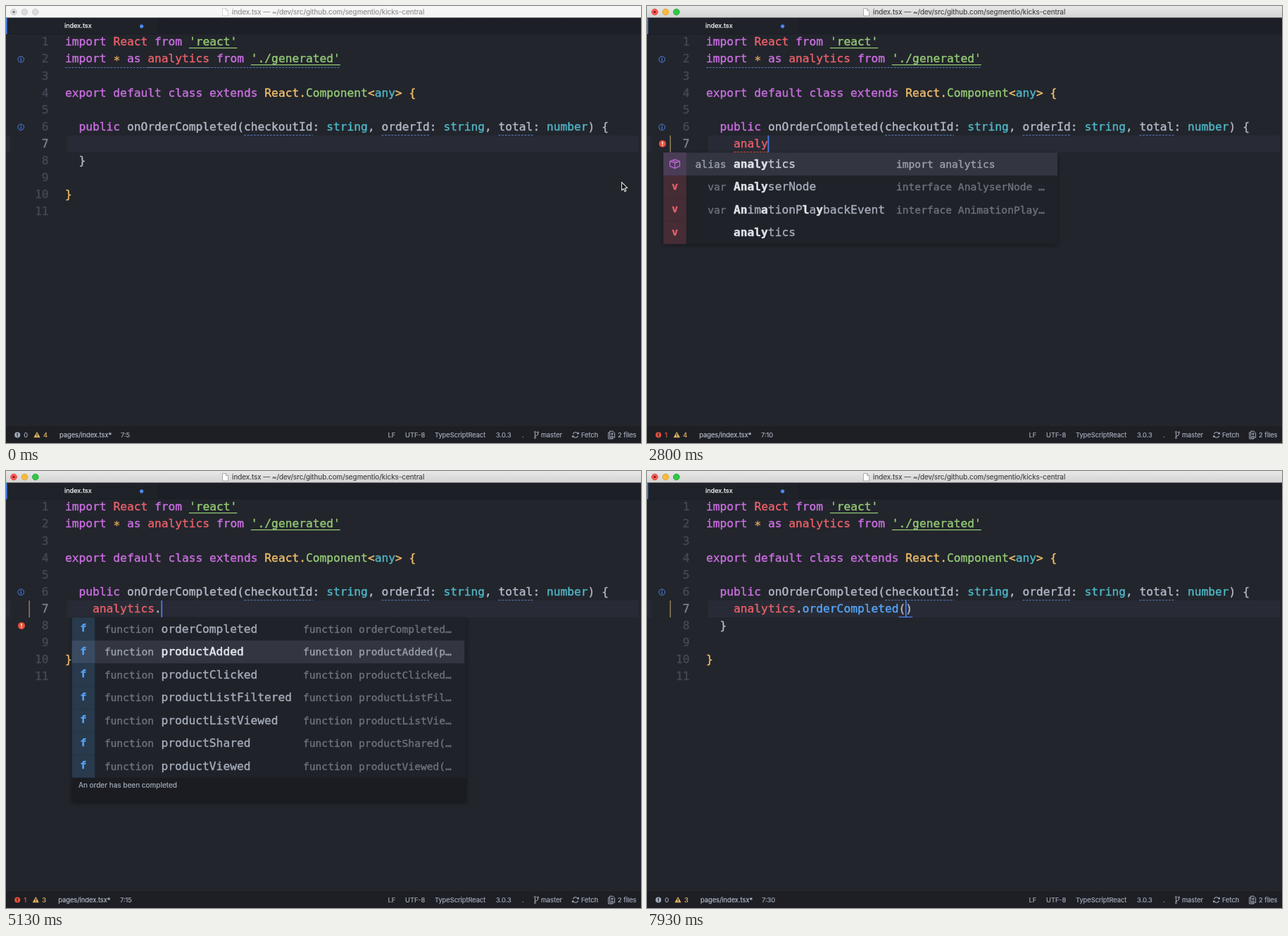
Recreate the animation shown at these times as an HTML page with a canvas. Size 902 by 621 pixels, loop 8000 ms.

```html
<!DOCTYPE html>
<html lang="en">
<head>
<meta charset="utf-8">
<title>Editor autocomplete</title>
<style>
html, body { margin: 0; width: 100%; height: 100%; overflow: hidden; background: #21252b; }
canvas { display: block; width: 902px; height: 621px; }
</style>
</head>
<body>
<canvas id="stage"></canvas>
<script>
const W = 902, H = 621, LOOP = 8000;
const canvas = document.getElementById('stage');
const ratio = window.devicePixelRatio || 1;
canvas.width = W * ratio;
canvas.height = H * ratio;
const g = canvas.getContext('2d');
g.scale(ratio, ratio);
g.lineJoin = 'round';

const mono = (size, bold) => `${bold ? 'bold ' : ''}${size}px "DejaVu Sans Mono", monospace`;
const ui = (size, weight = 400) => `${weight} ${size}px Inter, "Open Sans", sans-serif`;
const CODE = 16.23, LABEL = 14.6, PITCH = 9.771, LEFT = 84, TOP = 39.4, LINE = 24.1, ROW = 32.5;
const C = {
  bg: '#22252c', text: '#b2b9c5', purple: '#c96ee0', red: '#e9606a',
  green: '#93c874', yellow: '#efbd69', orange: '#dba05c', cyan: '#4fb6c6', blue: '#55a5f8',
  caret: '#4a80ee', error: '#e8503c', status: '#a4abb9', bright: '#e0e3ea'
};

const lines = {
  1: [['import ', 'purple'], ['React ', 'red'], ['from ', 'purple'], ["'react'", 'green']],
  2: [['import ', 'purple'], ['* ', 'orange', 2.6], ['as ', 'purple'], ['analytics ', 'red'], ['from ', 'purple'], ["'./generated'", 'green']],
  4: [['export default class extends ', 'purple'], ['React.', 'yellow'], ['Component', 'green'], ['<', 'yellow'], ['any', 'cyan'], ['> {', 'yellow']],
  6: [['  public ', 'purple'], ['onOrderCompleted(checkoutId: ', 'text'], ['string', 'cyan'], [', orderId: ', 'text'], ['string', 'cyan'], [', total: ', 'text'], ['number', 'cyan'], [') {', 'text']],
  8: [['  }', 'text']],
  10: [['}', 'yellow']]
};

// Timelines: [start, value]
const FOCUS = 470, TYPE = 1400, ACCEPT = 3130, LIST = 3670, DONE = 7270;
const typed = [[0, ''], [TYPE, 'a'], [1870, 'an'], [2000, 'ana'], [2170, 'anal'], [2330, 'analy'],
  [ACCEPT, 'analytics'], [3470, 'analytics.'], [DONE, 'analytics.orderCompleted()']];
const selection = [[0, 0], [5070, 1], [5400, 2], [5800, 3], [5970, 4], [6130, 5], [6300, 6],
  [6430, 5], [6550, 4], [6600, 3], [6650, 2], [6700, 1], [6800, 0]];
const described = [[0, 0], [5140, 1], [5470, 2], [5870, 3], [6040, 4], [6200, 5], [6370, 6], [6500, 5], [6870, 0]];
const at = (track, t) => track.filter(s => s[0] <= t).pop()[1];

const snippets = [['', 'amd-dep', 'AMD dependency'], ['', 'arr', 'fatarrow'], ['', 'amd-mod', 'AMD module name']];
const names = [['alias', 'analytics', 'import analytics'], ['var', 'AnalyserNode', 'interface AnalyserNode …'],
  ['var', 'AnimationPlaybackEvent', 'interface AnimationPlay…'], ['', 'analytics', '']];
const calls = [['orderCompleted', 'orderCompleted…'], ['productAdded', 'productAdded(p…'],
  ['productClicked', 'productClicked…'], ['productListFiltered', 'productListFil…'],
  ['productListViewed', 'productListVie…'], ['productShared', 'productShared(…'],
  ['productViewed', 'productViewed(…']].map(([n, s]) => ['function', n, 'function ' + s]);
const notes = ['An order has been completed', 'A product has been added', 'When a visitor clicks a product',
  'A product list has been filtered', 'A visitor views a product list', 'A customer shares a product.',
  'A customer views a product.'];

// A hairline outline gives the glyphs their slightly heavy weight
function text(s, x, y, color, font, align = 'left', weight = 0.4) {
  g.font = font;
  g.fillStyle = g.strokeStyle = color;
  g.lineWidth = weight;
  g.textAlign = align;
  g.fillText(s, x, y);
  g.strokeText(s, x, y);
}
function box(x, y, w, h, color) {
  g.fillStyle = color;
  g.fillRect(x, y, w, h);
}
function disc(x, y, r, color, edge) {
  g.beginPath();
  g.arc(x, y, r, 0, 7);
  if (color) { g.fillStyle = color; g.fill(); }
  if (edge) { g.strokeStyle = edge; g.lineWidth = 1; g.stroke(); }
}
function path(points, color, width = 1, fill) {
  g.beginPath();
  points.forEach(([x, y]) => g.lineTo(x, y));
  if (fill) { g.closePath(); g.fillStyle = fill; g.fill(); }
  if (color) { g.strokeStyle = color; g.lineWidth = width; g.stroke(); }
}
function dashes(x0, x1, y, color) {
  g.setLineDash([3, 1.6]);
  path([[x0, y], [x1, y]], color);
  g.setLineDash([]);
}
const colX = c => LEFT + c * PITCH;
const lineY = n => TOP + (n - 1) * LINE;
const baseY = n => lineY(n) + 16.9;

function codeLine(n, parts) {
  let c = 0;
  for (const [s, color, drop = 0] of parts) {
    text(s, colX(c), baseY(n) + drop, C[color], mono(CODE));
    c += s.length;
  }
}

function infoIcon(n) {
  const y = lineY(n) + 12.3;
  disc(21.2, y, 4.3, null, '#4b86ea');
  box(20.6, y - 2.6, 1.3, 1.3, '#4b86ea');
  box(20.6, y - 0.5, 1.3, 3.1, '#4b86ea');
}
function errorIcon(x, y, r, color, mark) {
  disc(x, y, r, color);
  box(x - 0.7, y - r * 0.6, 1.4, r * 0.7, mark);
  box(x - 0.7, y + r * 0.3, 1.4, 1.3, mark);
}

function titleBar(focused) {
  const grad = g.createLinearGradient(0, 0, 0, 16.5);
  grad.addColorStop(0, focused ? '#e8e8e8' : '#f7f7f7');
  grad.addColorStop(1, focused ? '#d3d3d3' : '#f4f4f4');
  box(0, 0, W, 16.5, grad);
  const lights = focused ? ['#fb5a54', '#fcbb3d', '#31c748'] : ['#dcdcdc', '#dcdcdc', '#dcdcdc'];
  const edges = focused ? ['#e2463f', '#e0a02f', '#22aa35'] : ['#c9c9c9', '#c9c9c9', '#c9c9c9'];
  lights.forEach((c, i) => disc(11 + i * 15.4, 8.5, 4.3, c, edges[i]));
  disc(11, 8.5, 1.6, focused ? '#7c1512' : '#6d6d6d');
  const edge = focused ? '#a5a5a5' : '#cdcdcd';
  path([[307.5, 3.5], [312.5, 3.5], [315.5, 6.5], [315.5, 14], [307.5, 14], [307.5, 3.5]], edge, 0.9, '#fff');
  path([[312.5, 3.5], [312.5, 6.5], [315.5, 6.5]], edge, 0.9);
  text('index.tsx — ~/dev/src/github.com/segmentio/kicks-central', 321, 12.1,
    focused ? '#404040' : '#8c8c8c', ui(9.83), 'left', 0.15);
}

function tabBar() {
  box(0, 16.5, W, 23, '#1c1f25');
  box(0, 16.5, 215, 23, '#1f2329');
  box(0, 39.3, W, 0.8, '#1a1c21');
  box(0, 17, 1.6, 23, C.caret);
  text('index.tsx', 83, 31.4, '#f2f4f8', ui(9.15), 'left', 0.25);
  disc(192.6, 28.8, 2.6, '#4d86f2');
}

function statusBar(t, word) {
  const failed = hasError(t);
  const shift = failed ? -1.7 : 0;
  const item = (s, x, color = C.status) => text(s, x, 613, color, ui(9.27), 'left', 0.2);
  box(0, 598, W, 23, '#1d1f25');
  box(0, 597.6, W, 0.8, '#191b20');
  errorIcon(16.2, 609.4, 4, failed ? C.error : C.status, '#1d1f25');
  item(failed ? '1' : '0', 25.3, failed ? C.error : C.status);
  const x = 44 + shift;
  path([[x, 605], [x + 4.6, 613.3], [x - 4.6, 613.3]], null, 1, '#e4b75f');
  box(x - 0.6, 607.6, 1.2, 2.8, '#1d1f25');
  box(x - 0.6, 611.2, 1.2, 1.1, '#1d1f25');
  item(unused(t) ? '4' : '3', 53 + shift, '#e4b75f');
  item('pages/index.tsx*', 76 + shift, '#b4bac6');
  item('7:' + (5 + caretChars(word)), 163 + shift * 0.6);
  [['LF', 542.5], ['UTF-8', 567], ['TypeScriptReact', 609], ['3.0.3', 696], ['.', 733],
    ['master', 760], ['Fetch', 817], ['2 files', 869]].forEach(([s, px]) => item(s, px));
  // branch
  path([[751.5, 606], [751.5, 613]], C.status);
  path([[751.5, 611.5], [755.5, 609.5], [755.5, 606.5]], C.status);
  [[751.5, 605.5], [751.5, 613.5], [755.5, 606]].forEach(([a, b]) => disc(a, b, 1.1, '#1d1f25', C.status));
  // refresh
  [0, Math.PI].forEach(a => {
    g.beginPath();
    g.arc(809, 609.5, 3.8, a + 0.35, a + Math.PI - 0.25);
    g.strokeStyle = C.status;
    g.lineWidth = 1.1;
    g.stroke();
  });
  path([[811, 608.3], [814.4, 608.3], [813.2, 605.2]], null, 1, C.status);
  path([[807, 610.7], [803.6, 610.7], [804.8, 613.8]], null, 1, C.status);
  // changed files
  path([[857.5, 606], [855.7, 606], [855.7, 615], [862, 615], [862, 614]], C.status);
  path([[857.7, 604.2], [862, 604.2], [864.6, 606.8], [864.6, 613.3], [857.7, 613.3], [857.7, 604.2]], C.status);
  path([[859, 608], [863, 608]], C.status);
  path([[861, 606], [861, 610]], C.status);
  path([[859, 611.5], [863, 611.5]], C.status);
}

const caretChars = word => word.endsWith(')') ? word.length - 1 : word.length;
const hasError = t => (t >= 2600 && t < 3330) || (t >= 3800 && t < 7670);
const unused = t => t < 3330;

function caretOn(t) {
  if (t < FOCUS) return false;
  if (t < TYPE) return (t - FOCUS) % 800 < 400;
  if (t < 4400) return true;
  if (t < DONE) return (t - 4000) % 800 < 400;
  return true;
}

function editor(t, word) {
  const y7 = lineY(7);
  box(0, y7, 6, LINE, '#282b35');
  box(87, y7, 812, LINE, '#282b35');
  for (let n = 1; n <= 11; n++) text(n, 60.5, baseY(n), n === 7 ? '#7d8490' : '#434953', mono(CODE), 'right');
  for (const n in lines) codeLine(+n, lines[n]);
  path([[colX(18), 59.7], [colX(25), 59.7]], C.green, 1.2);
  path([[colX(27), 83.7], [colX(40), 83.7]], C.green, 1.2);
  if (unused(t)) {
    dashes(LEFT, colX(40), 87.5, '#5278b4');
    if (t < FOCUS) path([[colX(12), 87.5], [colX(21), 87.5]], '#6c82a8');
    infoIcon(2);
  }
  [[26, 36], [46, 53], [63, 68]].forEach(([a, b]) => dashes(colX(a), colX(b), 183.5, '#5278b4'));
  infoIcon(6);

  if (t >= TYPE) box(32.4, y7, 1.5, LINE, '#92825a');
  const [, name, rest] = word.match(/^(\w*)(.*)$/);
  codeLine(7, [['    ' + name, 'red'], [rest.slice(0, 1), 'text'],
    [rest.slice(1, -2), 'blue'], [rest.length > 1 ? '()' : '', 'text']]);
  if (hasError(t)) {
    const n = t < 3330 ? 7 : 8;
    errorIcon(22, lineY(n) + 11.8, 5, C.error, '#fff');
    if (n === 7) dashes(colX(4), colX(4 + word.length), 207.5, C.error);
  }
  if (t >= DONE) path([[colX(28), 207.5], [colX(30), 207.5]], C.caret, 1.2);
  if (caretOn(t)) box(colX(4 + caretChars(word)) - 0.4, y7, 1.7, LINE, C.caret);
}

// Fuzzy-match highlighting, one glyph at a time
function matched(word, prefix, x, y, color) {
  let k = 0;
  [...word].forEach((ch, i) => {
    const hit = k < prefix.length && ch.toLowerCase() === prefix[k];
    if (hit) k++;
    text(ch, x + i * PITCH, y, hit ? C.bright : color, mono(CODE, hit));
  });
}

function snippetIcon(x, y) {
  const c = '#8cbf6b';
  box(x - 9, y - 1.3, 6, 2.6, c);
  path([[x - 4, y - 4.6], [x + 2.5, y], [x - 4, y + 4.6]], null, 1, c);
  box(x + 5, y - 4.6, 2.4, 9.2, c);
}
function packageIcon(x, y) {
  const c = '#bd66d3';
  path([[x, y - 6], [x + 7, y - 3.5], [x + 7, y + 3.5], [x, y + 6.5], [x - 7, y + 3.5], [x - 7, y - 3.5], [x, y - 6]], c, 1.3);
  path([[x - 7, y - 3.5], [x, y - 1], [x + 7, y - 3.5]], c, 1.3);
  path([[x, y - 1], [x, y + 6.5]], c, 1.3);
  path([[x - 3.5, y - 4.8], [x + 3.5, y - 2.2]], c, 1.2);
}
const letterIcon = (s, color) => (x, y) => text(s, x, y + 4.2, color, mono(14.5, true), 'center');

function popup(p) {
  const top = 208.3, w = p.right - p.left, h = p.rows.length * ROW;
  g.save();
  g.shadowColor = 'rgba(0,0,0,.4)';
  g.shadowBlur = 6;
  g.shadowOffsetY = 2;
  box(p.left, top, w + (p.note ? 3 : 0), h + (p.note ? 34 : 0), '#1f2228');
  g.restore();
  if (p.note) {
    box(p.left, top + h, w + 3, 34, '#1a1c21');
    text(p.note, 103, 450.2, C.status, ui(10), 'left', 0.2);
  }
  p.rows.forEach(([kind, word, label], i) => {
    const y = top + i * ROW, on = i === p.sel, base = y + 21.3;
    if (on) box(p.left, y, w, ROW, '#333640');
    box(p.left, y, 32.5, ROW, on ? p.tints[0] : p.tints[1]);
    p.icon(i)(p.left + 16.2, y + 15.9);
    const dim = on ? '#9aa0ab' : '#6c727d';
    text(kind, p.wordX - 10.5, base, dim, mono(LABEL), 'right');
    if (p.prefix) matched(word, p.prefix, p.wordX, base, on ? '#c4c9d2' : C.status);
    else text(word, p.wordX, base, on ? C.bright : C.status, mono(CODE), 'left', on ? 0.65 : 0.4);
    text(label, p.labelX, base, dim, mono(LABEL));
  });
}

function suggestions(t, word) {
  if (t >= 1500 && t < 1930) {
    popup({ left: 79, right: 354, wordX: 123, labelX: 206, rows: snippets, sel: 0, prefix: word,
      tints: ['#4a584a', '#3a473c'], icon: () => snippetIcon });
  } else if (t >= 1930 && t < ACCEPT) {
    popup({ left: 23.3, right: 583, wordX: 123, labelX: 354, rows: names, sel: 0, prefix: word,
      tints: ['#4b3d57', '#452c35'], icon: i => i ? letterIcon('v', C.red) : packageIcon });
  } else if (t >= LIST && t < DONE) {
    popup({ left: 93.7, right: 651, wordX: 220.5, labelX: 422, rows: calls, sel: at(selection, t),
      note: notes[at(described, t)], tints: ['#3a4b61', '#283a4c'], icon: () => letterIcon('f', C.blue) });
  }
}

function pointer(x, y) {
  path([[x, y], [x, y + 11.5], [x + 2.6, y + 9.2], [x + 4.4, y + 13.2], [x + 6.2, y + 12.3],
    [x + 4.5, y + 8.4], [x + 8, y + 8.2], [x, y]], '#e8e8e8', 1.1, '#0c0c0e');
}

function draw(t) {
  const word = at(typed, t);
  box(0, 0, W, H, C.bg);
  tabBar();
  titleBar(t >= FOCUS);
  editor(t, word);
  suggestions(t, word);
  statusBar(t, word);
  if (t < TYPE) pointer(874.6, 250.4);
}

const start = performance.now();
function tick() {
  draw((performance.now() - start) % LOOP);
  requestAnimationFrame(tick);
}
tick();
</script>
</body>
</html>
```
